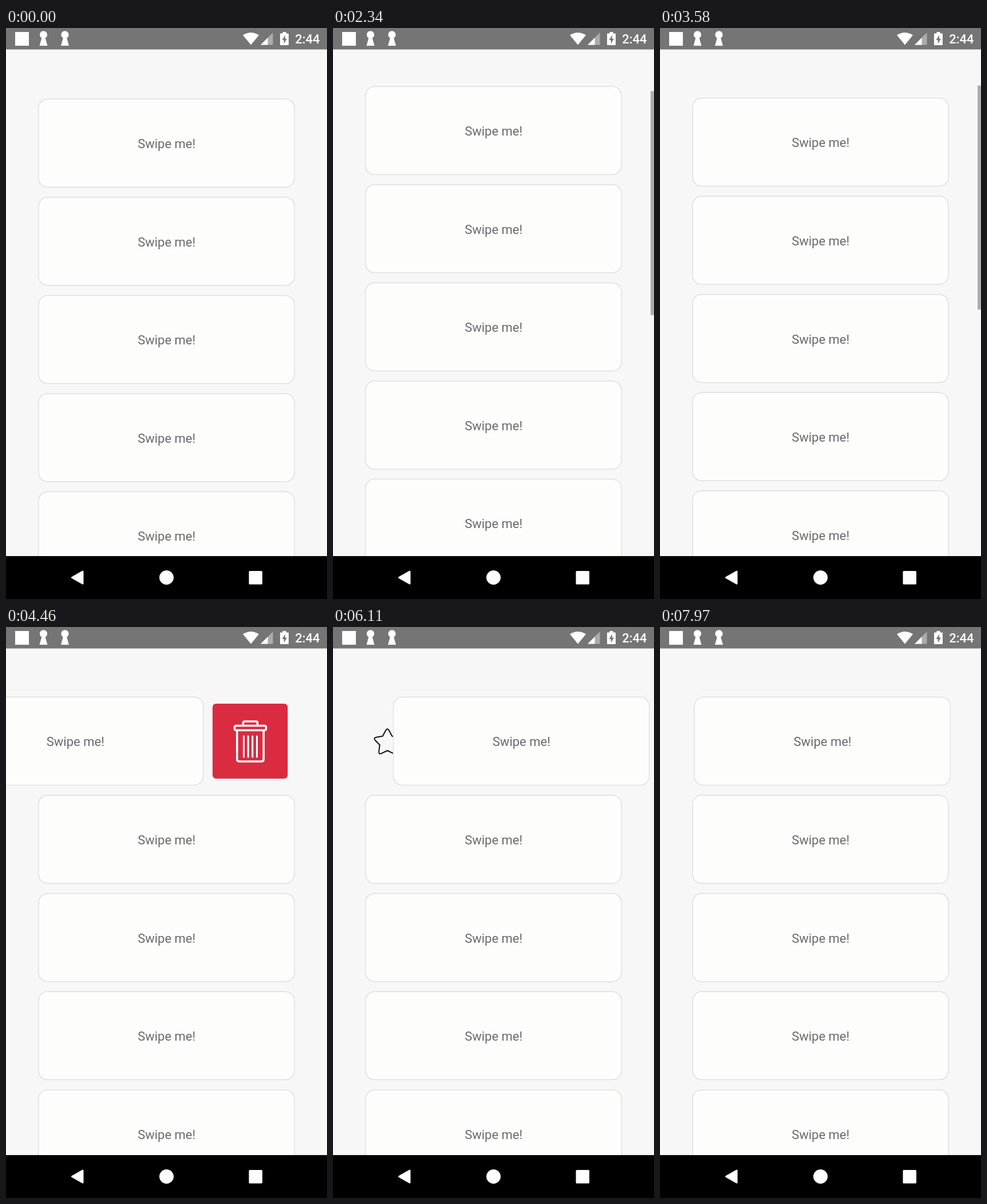
Animation, 561 px wide and 998 px high, one loop 8000 ms. Source, as an HTML page:

```html
<!DOCTYPE html>
<html lang="en">
<head>
<meta charset="utf-8">
<title>Swipeable list</title>
<style>
@property --scroll { syntax: "<number>"; inherits: true; initial-value: 0; }

html, body { margin: 0; width: 100%; height: 100%; overflow: hidden; background: #f7f7f8; }
svg { display: block; width: 100%; height: 100%; animation: scroll 8s linear infinite; }
text { font-family: Roboto, "Noto Sans", sans-serif; font-size: 22px; }

.list { transform: translateY(calc(var(--scroll) * -1px)); }
.bar { transform: translateY(calc(var(--scroll) * .475px)); animation: bar 8s linear infinite; }
.swipe { animation: swipe 8s linear infinite; }
.card rect { fill: #fdfdfc; stroke: #dfdfe2; stroke-width: 1.5; }
.card text { fill: #6a6a6a; text-anchor: middle; }

@keyframes scroll {
  0%, 29.24% { --scroll: 0; }
  29.25%, 30.125% { --scroll: 22; }
  30.75% { --scroll: 58; }
  31.375% { --scroll: 90; }
  32% { --scroll: 118; }
  32.625% { --scroll: 138; }
  33.125%, 35.37% { --scroll: 148; }
  35.375%, 36% { --scroll: 145.6; }
  37.5% { --scroll: 118; }
  39.375% { --scroll: 72; }
  41.25% { --scroll: 32; }
  43.125% { --scroll: 9; }
  44.62%, 100% { --scroll: 1.7; }
}

@keyframes bar {
  0%, 29.24% { opacity: 0; }
  29.25%, 48.75% { opacity: 1; }
  52%, 100% { opacity: 0; }
}

/* drag left, settle open, close, drag right, settle open, close */
@keyframes swipe {
  0%, 48.75% { transform: translateX(0); }
  50% { transform: translateX(-18px); }
  52.5% { transform: translateX(-78px); }
  55% { transform: translateX(-140px); }
  57.75% { transform: translateX(-210px); }
  58.75% { transform: translateX(-228px); }
  59.5% { transform: translateX(-212px); }
  60.6% { transform: translateX(-180px); }
  61.9% { transform: translateX(-163px); }
  64.4%, 68.74% { transform: translateX(-155.5px); }
  68.75%, 69.87% { transform: translateX(-120.7px); }
  70% { transform: translateX(-95px); }
  71.25% { transform: translateX(-50px); }
  72.5% { transform: translateX(-18px); }
  73.75% { transform: translateX(-5px); }
  74.75% { transform: translateX(0); }
  75.6% { transform: translateX(20px); }
  77.25% { transform: translateX(80px); }
  78.75% { transform: translateX(135px); }
  80.25% { transform: translateX(172px); }
  80.75% { transform: translateX(177px); }
  81.5% { transform: translateX(160px); }
  82.5% { transform: translateX(122px); }
  83.75% { transform: translateX(94px); }
  85% { transform: translateX(82px); }
  85.75%, 92.87% { transform: translateX(78.6px); }
  92.875% { transform: translateX(70px); }
  94.375% { transform: translateX(38px); }
  95.6% { transform: translateX(21px); }
  96.875% { transform: translateX(11px); }
  98.125% { transform: translateX(6px); }
  99.625%, 100% { transform: translateX(3.3px); }
}
</style>
</head>
<body>
<svg viewBox="0 0 561 998" preserveAspectRatio="none">
  <defs>
    <clipPath id="view"><rect y="99.5" width="561" height="824"/></clipPath>
    <g id="card" class="card">
      <rect x="56.8" y="124.2" width="447.4" height="154" rx="16"/>
      <text x="280.7" y="210">Swipe me!</text>
    </g>
    <path id="keyhole" fill="#fff" d="M-3.2 17.5A6.6 6.6 0 1 1 3.2 17.5L7 31H-7Z"/>
  </defs>

  <rect width="561" height="998" fill="#f7f7f8"/>

  <g clip-path="url(#view)">
    <g class="list">
      <g transform="translate(0 1.7)">
        <rect x="361" y="134" width="131.3" height="131" rx="6" fill="#da2b41"/>
        <g fill="none" stroke="#fff" stroke-width="3.6" stroke-linejoin="round" stroke-linecap="round">
          <path d="M414.5 172V167.5Q414.5 165 417 165H437Q439.500 165 439.500 167.500V172"/>
          <rect x="399.5" y="172.500" width="55" height="8" rx="2.500"/>
          <path d="M403.800 181V231Q403.800 235 408 235H446Q450.200 235 450.200 231V181"/>
          <path stroke-width="3" d="M415.500 191V227M423.200 191V227M430.800 191V227M438.500 191V227"/>
        </g>
        <path fill="none" stroke="#111" stroke-width="2" stroke-linejoin="round"
          d="M92.1 180.8Q95 175.5 97.900 180.800L103.200 190.700L114.300 192.700Q120.200 193.800 116 198.200L108.300 206.300L109.800 217.400Q110.600 223.400 105.100 220.800L95 216L84.900 220.800Q79.400 223.400 80.200 217.400L81.700 206.300L74 198.200Q69.800 193.800 75.700 192.700L86.800 190.700Z"/>
      </g>
      <g class="swipe"><use href="#card"/></g>
      <use href="#card" y="171.6"/>
      <use href="#card" y="343.2"/>
      <use href="#card" y="514.8"/>
      <use href="#card" y="686.4"/>
      <use href="#card" y="858"/>
    </g>
    <rect class="bar" x="555" y="99.8" width="6" height="391.5" fill="#adadad"/>
  </g>

  <!-- status bar -->
  <rect width="561" height="37.5" fill="#757575"/>
  <g fill="#fff">
    <rect x="16" y="7" width="24" height="24"/>
    <use href="#keyhole" x="65.5"/>
    <use href="#keyhole" x="103"/>
    <path d="M428 29.5L414 12.500Q428 3.500 442 12.500Z"/>
    <path opacity=".4" d="M445 29.500L466.500 8V29.500Z"/>
    <path d="M445 29.500L457.500 17V29.500Z"/>
    <path d="M483.500 7H489.500V9.500H493Q494 9.500 494 10.500V29Q494 30 493 30H480Q479 30 479 29V10.500Q479 9.500 480 9.500H483.500Z"/>
    <path fill="#757575" d="M487.800 12.500L482.500 21H485.700V27.500L491 18.700H487.800Z"/>
    <text x="505.200" y="27" font-weight="500">2:44</text>
  </g>

  <!-- navigation bar -->
  <rect y="923" width="561" height="75"/>
  <g fill="#fff" stroke="#fff" stroke-width="3" stroke-linejoin="round">
    <path d="M115.500 960.500L134 950V971Z"/>
    <circle cx="280.500" cy="960.500" r="11"/>
    <rect x="426" y="950.500" width="20.500" height="20.500"/>
  </g>
</svg>
</body>
</html>
```
